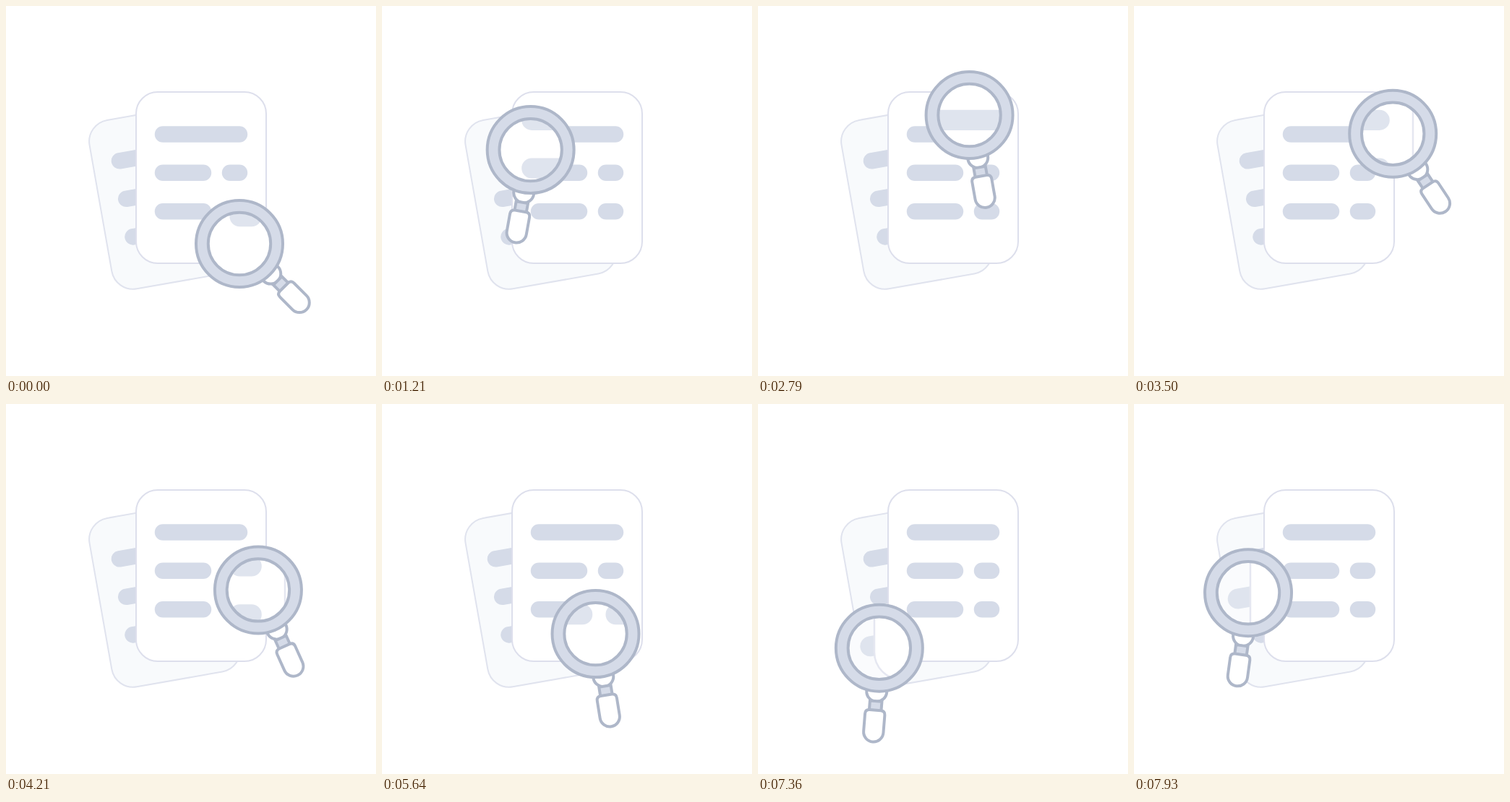
An HTML page for the animation above (8 s loop, 512 by 512 pixels).

```html
<!DOCTYPE html>
<html lang="en">
<head>
<meta charset="utf-8">
<title>Document search</title>
<style>
  html, body { margin: 0; width: 100%; height: 100%; overflow: hidden; background: #fff; }
  svg { display: block; width: 100%; height: 100%; }
  .bars { fill: none; stroke: #d5dbe8; stroke-width: 22.5; stroke-linecap: round; }
  .card { stroke-width: 2; }
  .line { stroke: #aeb7c9; stroke-width: 4; }
</style>
</head>
<body>
<svg viewBox="0 0 512 512">
  <defs>
    <g id="card">
      <rect class="card" x="-90" y="-118.5" width="180" height="237" rx="30"/>
      <path class="bars" d="M-53 -60H53M-53 -6.7H3M40 -6.7H53M-53 46.7H3M40 46.7H53"/>
    </g>
    <g id="docs">
      <use href="#card" transform="translate(219.6 264.2) rotate(-10)" fill="#f8fafc" stroke="#e0e3ee"/>
      <use href="#card" transform="translate(270 237.5)" fill="#fff" stroke="#dddfec"/>
    </g>
    <clipPath id="lens"><circle id="hole" r="43"/></clipPath>
  </defs>

  <use href="#docs"/>

  <g id="handle" class="line" fill="#fff">
    <circle cx="1.2" cy="60" r="14"/>
    <path d="M-7.1 73.5h16.6v13h-16.6Z" fill="#d5dbe8"/>
    <path d="M-6.5 86h15.4q6 0 6 6v24.3a13.7 13.7 0 0 1 -27.4 0v-24.3q0 -6 6 -6Z"/>
  </g>

  <g clip-path="url(#lens)">
    <rect width="512" height="512" fill="#fff"/>
    <use href="#docs" opacity=".75" transform="translate(256 256) scale(1.25) translate(-256 -256)"/>
  </g>

  <g id="ring" fill="none">
    <circle r="51.5" stroke="#d5dbe8" stroke-width="17"/>
    <circle class="line" r="60"/>
    <circle class="line" r="43.2"/>
  </g>
</svg>
<script>
  const LOOP = 8000, STEPS = 112;

  // Key poses of the lens; one with a rest stops there for that long
  const pose = (time, x, y, turn, rest = 0) => ({ time, x, y, turn, rest });
  const poses = [
    pose(0, 323, 329, -45, 20),
    pose(1210, 206, 199.5, 10),
    pose(1710, 186, 170, 25),
    pose(2790, 293, 151, -10.2),
    pose(3430, 356, 171, -33),
    pose(4210, 349, 257, -24.3),
    pose(4860, 333, 311, -10, 500),
    pose(5640, 296, 318, -9.2),
    pose(6210, 193, 335, 3),
    pose(6570, 168, 339, 4.5, 720),
    pose(7930, 158, 261, 7.8)
  ];

  const rate = (a, b, key) => (b[key] - a[key]) / (b.time - a.time - a.rest);

  function slope(i, key) {
    const [prev, here, next] = [poses[i - 1], poses[i], poses[i + 1]];
    if (here.rest) return 0;
    return next ? rate(prev, next, key) : rate(prev, here, key) * 1.5;
  }

  // Smooth cubic curve through the poses
  function at(t, key) {
    const j = Math.max(1, poses.findIndex(p => p.time > t));
    const i = (t >= poses.at(-1).time ? poses.length - 1 : j) - 1;
    const [a, b] = [poses[i], poses[i + 1]];
    const d = b.time - a.time - a.rest;
    const s = Math.min(1, Math.max(0, (t - a.time - a.rest) / d)), r = 1 - s;
    return a[key] * r * r * (1 + 2 * s) + b[key] * s * s * (1 + 2 * r)
      + d * s * r * (slope(i, key) * r - slope(i + 1, key) * s);
  }

  const [hole, handle, ring] = ['hole', 'handle', 'ring'].map(id => document.getElementById(id));

  function draw(now) {
    // The motion runs at 14 pictures per second
    const step = Math.floor((now % LOOP + 5) * STEPS / LOOP) % STEPS;
    const t = step * LOOP / STEPS;
    const move = `translate(${at(t, 'x')} ${at(t, 'y')})`;
    hole.setAttribute('transform', move);
    ring.setAttribute('transform', move);
    handle.setAttribute('transform', `${move} rotate(${at(t, 'turn')})`);
  }

  const start = performance.now();
  function tick() {
    draw(performance.now() - start);
    requestAnimationFrame(tick);
  }
  tick();
</script>
</body>
</html>
```
